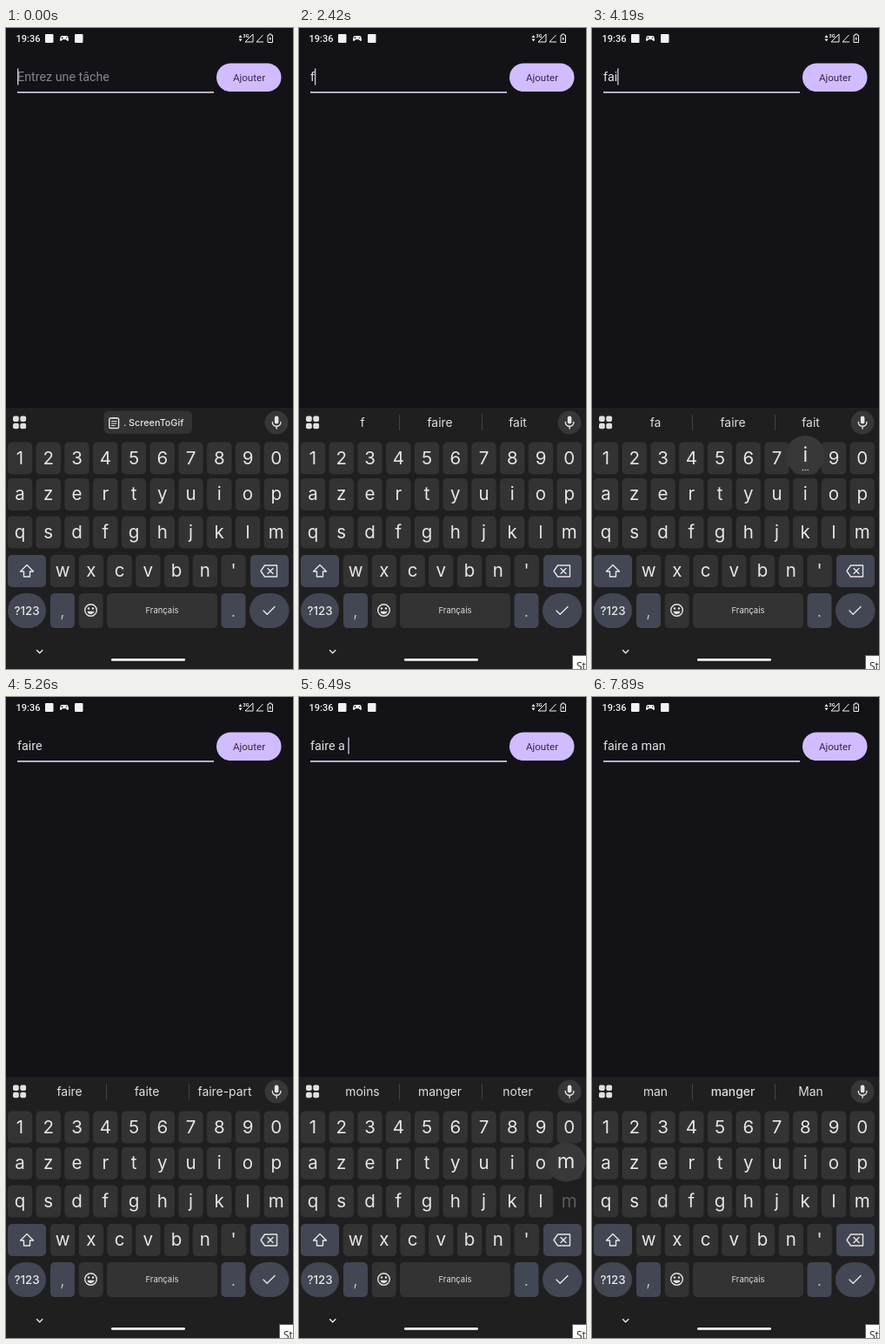
Animation of 330x736 px, one loop 8 s. Source, as an HTML page:

```html
<!DOCTYPE html>
<html lang="fr">
<head>
<meta charset="utf-8">
<title>Saisie d'une tâche</title>
<style>
  html, body { margin: 0; width: 100%; height: 100%; overflow: hidden; background: #121217; }
  svg { display: block; width: 100vw; height: 100vh; }
  text { white-space: pre; }
  .field { font: 400 14.3px Roboto, sans-serif; }
  .key { font: 400 20.5px Inter, sans-serif; fill: #e6e6e6; text-anchor: middle; }
  .small { font: 400 9.5px Inter, sans-serif; fill: #dcdcdc; text-anchor: middle; }
  .word { font: 400 13.9px Inter, sans-serif; fill: #dedede; text-anchor: middle; }
  .line { fill: none; stroke: #e6e6e6; stroke-width: 1.4; stroke-linecap: round; stroke-linejoin: round; }
</style>
</head>
<body>
<svg id="stage" viewBox="0 0 330 736" preserveAspectRatio="none">
  <rect width="330" height="736" fill="#121217"/>

  <g id="status" fill="#f2f2f2">
    <text x="11.5" y="16" style="font:500 11px Roboto,sans-serif">19:36</text>
    <rect x="45" y="7" width="9.5" height="10" rx="1"/>
    <rect x="79" y="7" width="9.5" height="10" rx="1"/>
    <path d="M64 9h6q1.3 0 1.7 2.4l.3 2.2q0 1.6-1.3 1.3l-1.8-1.7h-3.8l-1.8 1.7q-1.3.3-1.3-1.3l.3-2.200q.4-2.400 1.700-2.400z"/>
    <path d="M64.500 10.200v2M63.500 11.200h2M69.500 10.500v1.500" stroke="#121217" stroke-width=".8"/>
    <path d="M267.500 11l2-3 2 3zM267.500 12.500l2 3 2-3z"/>
    <text x="272.500" y="11" style="font:700 5.500px Roboto,sans-serif">3G</text>
    <path d="M275 16l9-9v9z" fill="none" stroke="#f2f2f2"/>
    <path d="M295.500 8l-7.500 8h8" fill="none" stroke="#f2f2f2"/>
    <path d="M302.500 7h2.500v1.300h1.500v8.200h-5.500V8.300h1.500z" fill="none" stroke="#f2f2f2"/>
    <path d="M304.300 9.500l-2 3.200h1.400l-.4 2.400 2-3.300h-1.400z"/>
  </g>

  <text id="hint" class="field" x="13" y="61" fill="#85858b">Entrez une tâche</text>
  <text id="typed" class="field" x="13" y="61" fill="#e4e1e6"></text>
  <rect id="caret" y="46.5" width="1.3" height="19" fill="#d4cae6"/>
  <rect x="13" y="73" width="226" height="1.7" fill="#d4cae6"/>
  <rect x="242" y="40.5" width="74.5" height="32.5" rx="16.25" fill="#d0bcff"/>
  <text x="279.5" y="61.3" fill="#34264f" text-anchor="middle" style="font:400 11.6px Roboto,sans-serif">Ajouter</text>

  <rect y="436" width="330" height="300" fill="#1f1f1f"/>
  <g fill="#e0e0e0">
    <rect x="8" y="445.5" width="6.8" height="6.5" rx="2"/>
    <rect x="16.3" y="445.5" width="6.8" height="6.5" rx="2"/>
    <rect x="8" y="453.7" width="6.8" height="6.5" rx="2"/>
    <rect x="16.3" y="453.7" width="6.8" height="6.5" rx="2"/>
  </g>
  <circle cx="311" cy="453" r="13.5" fill="#373737"/>
  <rect x="308.8" y="445.5" width="4.6" height="9" rx="2.3" fill="#e6e6e6"/>
  <path class="line" d="M306.3 452.5a4.8 4.8 0 0 0 9.6 0M311.1 457.5v2.5"/>

  <g id="chip">
    <rect x="112.5" y="439.5" width="101.5" height="26.5" rx="6" fill="#333"/>
    <rect class="line" x="118.8" y="448" width="10.8" height="11.5" rx="1.2"/>
    <path class="line" d="M122 447.5h4.5M121.5 451.5h5.5M121.5 454h5.5M121.5 456.5h3.5" style="stroke-width:1.2"/>
    <text x="135" y="457" fill="#e3e3e3" style="font:500 10.8px Inter,sans-serif">. ScreenToGif</text>
  </g>
  <g id="words">
    <path d="M115.5 444v18M210.5 444v18" stroke="#434343"/>
    <text class="word" x="73" y="458"></text>
    <text class="word" x="162" y="458"></text>
    <text class="word" x="251.5" y="458"></text>
  </g>

  <g id="keys"></g>
  <g id="icons">
    <path class="line" d="M24 616.5l7.500 7.500h-4v6h-7v-6h-4z"/>
    <path class="line" d="M297.5 617h14v13h-14l-4.500-6.500zM301 620.500l6 6M307 620.500l-6 6"/>
    <circle class="line" cx="97.5" cy="668.5" r="6.800"/>
    <circle cx="95" cy="666.5" r="1.2" fill="#e6e6e6"/>
    <circle cx="100" cy="666.5" r="1.2" fill="#e6e6e6"/>
    <path d="M93.500 669.800h8a4.100 4.100 0 0 1-8 0z" fill="#e6e6e6"/>
    <path class="line" d="M296 669l4.200 4.200 8.800-8.800"/>
    <path class="line" d="M35.500 714.500l3.200 3.200 3.200-3.200"/>
    <rect x="121" y="724" width="85" height="2.800" rx="1.400" fill="#fff"/>
  </g>
  <g id="popups"></g>
  <g id="tip">
    <rect x="314.5" y="720.5" width="20" height="20" fill="#fff" stroke="#6a6a6a"/>
    <text x="319" y="737" fill="#222" style="font:400 12px 'Open Sans',sans-serif">Stop</text>
  </g>
</svg>
<script>
const LOOP = 8000, BLINK = 500, LINGER = 150, TIP_AT = 1100;

// key, pressed at, committed at, suggestions that follow
const PRESSES = [
  ['f', 2200, 2270, 'f faire fait'],
  ['a', 3620, 3720, 'fa faire fait'],
  ['i', 4060, 4160, 'fai faire fait'],
  ['r', 4470, 4560, 'fair faire faites'],
  ['e', 4670, 4760, 'faire faite faire-part'],
  [' ', 5370, 5450, 'un a une'],
  ['a', 5610, 5700, 'a à au'],
  [' ', 6040, 6120, 'moins manger noter'],
  ['m', 6450, 6540, 'm manger moins'],
  ['a', 6850, 6940, 'ma manger mal'],
  ['n', 7030, 7120, 'man manger Man']
].map(([key, down, up, words]) => ({ key, down, up, words: words.split(' ') }));

const $ = id => document.getElementById(id);
const keys = {};

function add(parent, tag, attrs, content = '') {
  const el = document.createElementNS('http://www.w3.org/2000/svg', tag);
  for (const name in attrs) el.setAttribute(name, attrs[name]);
  el.textContent = content;
  parent.append(el);
  return el;
}

function addKey(label, x, y, w = 28.4, h = 37, opts = {}) {
  const { fill = '#333333', rx = 5, cls = 'key', text = label, drop = 6.6, style = '' } = opts;
  const g = add($('keys'), 'g', {});
  const cap = add(g, 'rect', { x, y, width: w, height: h, rx, fill });
  const glyph = add(g, 'text', { x: x + w / 2, y: y + h / 2 + drop, class: cls, style }, text);
  keys[label] = { cap, glyph, cx: x + w / 2, cy: y + h / 2 };
}

const LEFT = 1.8, PITCH = 32.75, ACCENT = '#434653';
['1234567890', 'azertyuiop', 'qsdfghjklm'].forEach((row, r) =>
  [...row].forEach((c, i) => addKey(c, LEFT + PITCH * i, [475.5, 517, 560.5][r])));
[..."wxcvbn'"].forEach((c, i) => addKey(c, LEFT + PITCH * (i + 1.5), 605));
const special = { fill: ACCENT, text: '' };
const pill = { fill: ACCENT, rx: 20 };
const mark = { fill: ACCENT, drop: 7, style: 'fill:#c8cad4;font-weight:300' };
addKey('shift', 2, 605, 44, 37, special);
addKey('back', 281, 605, 44, 37, special);
addKey('?123', 2, 649, 44, 40, { ...pill, drop: 4.5, style: 'font-size:13.3px;font-weight:500' });
addKey(',', 51, 649, 28, 40, mark);
addKey('emoji', 83.7, 649, 28, 40, { text: '' });
addKey(' ', 116, 649, 127, 40, { text: 'Français', cls: 'small', drop: 3 });
addKey('.', 247.5, 649, 28, 40, mark);
addKey('enter', 280, 649, 45.5, 40, { ...pill, text: '' });

for (const press of PRESSES) {
  if (press.key === ' ') continue;
  const { cx, cy } = keys[press.key];
  const x = Math.min(307, Math.max(20.5, cx)), y = cy - 45;
  press.popup = add($('popups'), 'g', {});
  add(press.popup, 'circle', { cx: x, cy: y, r: 22.5, fill: '#383838' });
  add(press.popup, 'text', { x, y: y + 7, class: 'key', style: 'font-size:23.5px' }, press.key);
  if ('aien'.includes(press.key))
    for (const d of [-3, 0, 3])
      add(press.popup, 'circle', { cx: x + d, cy: y + 17, r: .8, fill: '#d0d0d0' });
}

const show = (el, on) => el.setAttribute('visibility', on ? 'visible' : 'hidden');
const wordEls = [...$('words').querySelectorAll('text')];
const pen = document.createElement('canvas').getContext('2d');
pen.font = '400 14.3px Roboto, sans-serif';

function draw(t) {
  const done = PRESSES.filter(p => t >= p.up);
  const typed = done.map(p => p.key).join('');
  $('typed').textContent = typed;
  show($('hint'), !typed);

  const since = done.length ? t - done[done.length - 1].up : t + 30;
  $('caret').setAttribute('x', 13 + pen.measureText(typed).width);
  show($('caret'), Math.floor(since / BLINK) % 2 === 0);

  const last = PRESSES.filter(p => t >= p.up + LINGER).pop();
  show($('chip'), !last);
  show($('words'), last);
  if (last) wordEls.forEach((el, i) => { el.textContent = last.words[i]; });
  wordEls[1].style.fontWeight = typed.endsWith('man') ? 500 : 400;

  for (const { key } of PRESSES) {
    const held = PRESSES.some(p => p.key === key && t >= p.down && t < p.up);
    const { cap, glyph } = keys[key];
    if (key === ' ') cap.setAttribute('fill', held ? '#454545' : '#333333');
    else {
      cap.setAttribute('opacity', held ? 0 : 1);
      glyph.setAttribute('opacity', held ? .3 : 1);
    }
  }
  for (const p of PRESSES)
    if (p.popup) show(p.popup, t >= p.down && t < p.up + LINGER);
  show($('tip'), t >= TIP_AT);
}

const start = performance.now();
function tick() {
  draw((performance.now() - start) % LOOP);
  requestAnimationFrame(tick);
}
tick();
</script>
</body>
</html>
```
